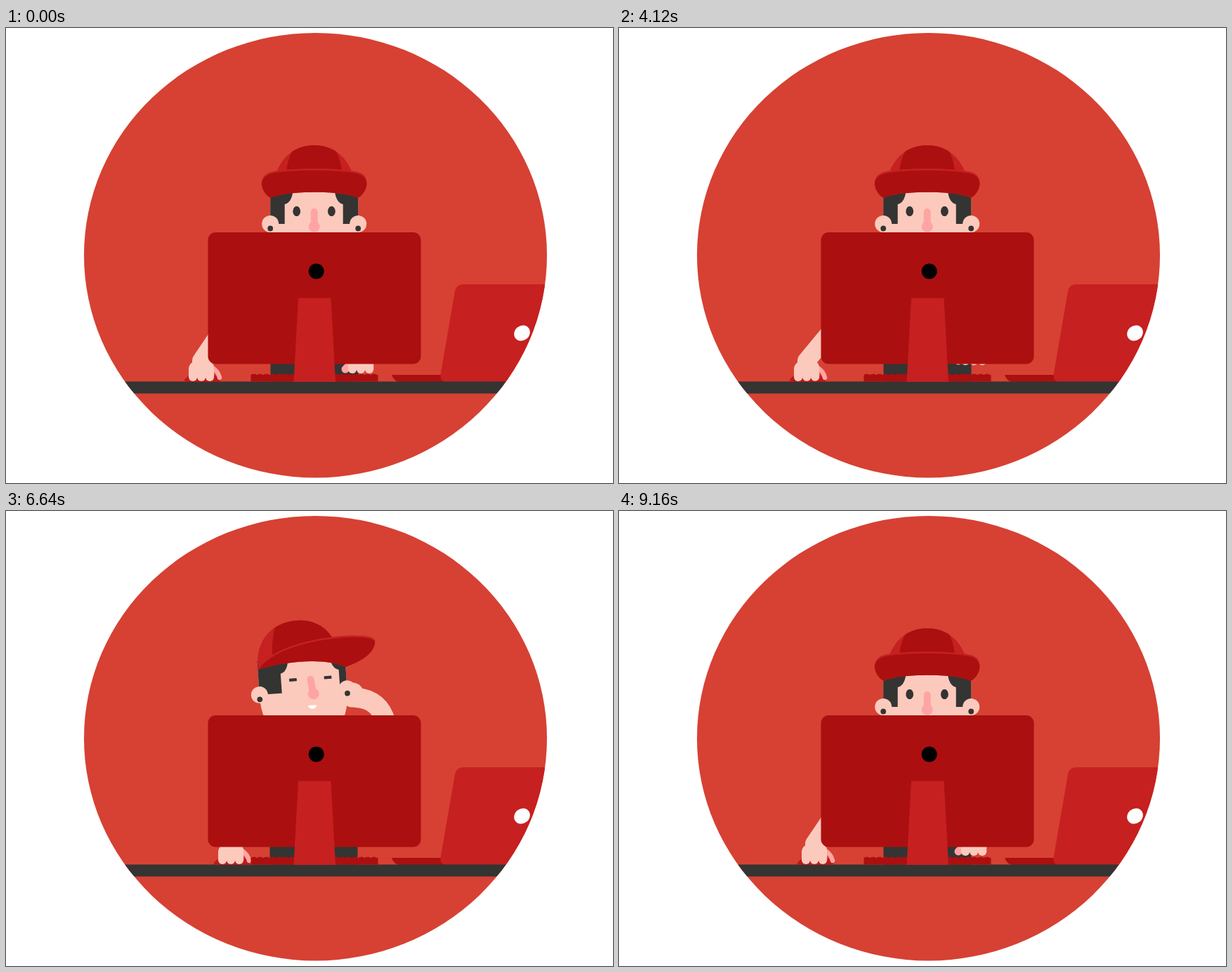
Animation of 864 by 648 pixels, one loop 9.2 s. Source, as an HTML page with a canvas:

```html
<!DOCTYPE html>
<html lang="en">
<head>
<meta charset="utf-8">
<title>At the desk</title>
<style>
html, body { margin: 0; width: 100%; height: 100%; overflow: hidden; background: #fff; }
canvas { display: block; }
</style>
</head>
<body>
<canvas id="stage" width="864" height="648"></canvas>
<script>
const c = document.getElementById('stage').getContext('2d');
const LOOP = 9200, STEP = 40, TAU = Math.PI * 2;
const BACK = '#d64133', DEEP = '#ac0f0f', RED = '#c62020', DARK = '#343433',
      SKIN = '#fbcabd', PINK = '#ffa4a4', WHITE = '#fff';
let now = 0;

const lerp = (a, b, k) => a + (b - a) * k;

// Eased 0 to 1 between two times.
function go(from, to) {
  const k = Math.min(1, Math.max(0, (now - from) / (to - from)));
  return k * k * (3 - 2 * k);
}

// Rises, holds, then falls back.
const pulse = (a, b, d, e) => go(a, b) - go(d, e);

function fill(color) { c.fillStyle = color; c.fill(); }

function oval(x, y, rx, ry, color, rot = 0) {
  c.beginPath();
  c.ellipse(x, y, rx, ry, rot, 0, TAU);
  fill(color);
}

function box(x, y, w, h, r, color) {
  c.beginPath();
  c.roundRect(x, y, w, h, r);
  fill(color);
}

function shape(path, color) {
  c.fillStyle = color;
  c.fill(new Path2D(path));
}

function stroke(path, width, color) {
  c.lineWidth = width;
  c.lineCap = c.lineJoin = 'round';
  c.strokeStyle = color;
  c.stroke(new Path2D(path));
}

// Fills one outline, then a second one only where it overlaps the first.
function inset(outer, color, inner, innerColor, dy = 0) {
  shape(outer, color);
  c.save();
  c.clip(new Path2D(outer));
  c.translate(0, dy);
  shape(inner, innerColor);
  c.restore();
}

// k: 0 faces forward, 1 half turned, 2 fully turned.
function cap(k) {
  const q = Math.min(1, k), top = -112 + 10 * (k - q);
  const crown = `M${-54 - 4 * k} ${-73 + 17.5 * k}
    C${-45 - 9.5 * k} ${-97 + 12 * k} ${-26 - 8 * k} ${top} ${-k} ${top}
    C${26 - 4 * k} ${top} ${45 - 4 * k} ${-97 + 2 * k} ${54 - 3.5 * k} -73Z`;
  const panel = `M-40 ${-72 + 10 * k}
    C${-38 - 1.5 * k} ${-90 + 7 * k} -34 ${-101 + 6 * k} ${-25 - 4 * k} ${top - 1}
    H${25 + 8 * k}
    C${34 + 7 * k} ${-101 + 3 * k} ${38 + 7 * k} -90 ${40 + 7 * k} -70Z`;
  inset(crown, RED, panel, DEEP);

  const far = -75 + 13 * q, tip = 75 + 16 * k, farTop = -75 + 9 * k;
  const brim = `M${far} ${-57 + 10 * k}
    Q${far + 2 * k} ${farTop + 3 + 4 * k} ${-57 + 10 * k} ${farTop}
    C${-28 + 13 * k} ${-80 + 3 * k} ${30 + 10 * k} ${-80 + 1.5 * k} ${57 + 11 * k} -75
    Q${tip} -73 ${tip} ${-57 - 8 * q}
    Q${tip - 2} -43 62 ${-37 + 3 * k}
    C42 ${-48 + 2 * k} ${-40 + 14 * k} -48 -62 ${-37 + q}
    Q${far + 2} ${-43 + 4 * k} ${far} ${-57 + 10 * k}Z`;
  inset(brim, RED, brim, DEEP, 2.6);
}

function eye(x, open) {
  c.save();
  c.beginPath();
  c.rect(x - 8, -18 - 7 * open, 16, 14 * open);
  c.clip();
  oval(x, -18, 5.4, 7.2, DARK);
  c.restore();
}

function head(right) {
  const left = pulse(1500, 1900, 3120, 3520), dip = pulse(4800, 5040, 5040, 5560);
  const smile = pulse(6800, 7160, 8280, 8600), open = 1 - .7 * pulse(5240, 5560, 6800, 7000);
  const k = left + 2 * right, s = 7.5 * k - 1.75 * right * k;
  c.save();
  c.translate(438.7 - 15.5 * right + 1.8 * smile, 279 + left + 14 * dip - 21.5 * right + .5 * smile);
  c.rotate((.3 * smile - 4 * right) * Math.PI / 180);
  if (left > 0) c.scale(-1, 1);

  shape('M-62.5 -45H62.5V4C62 50 35 75 0 75S-62 50 -62.5 4Z', SKIN);
  box(-62.5, -48, 125, 48, 0, DARK);
  shape(`M${s - 42} 1v-29q10 -2 12 -20h59q2 18 12 20v29Z`, SKIN);
  for (const x of [-62.5, 62.5]) {
    oval(x, 0, 12, 12, SKIN);
    oval(x, 6.5, 3.9, 3.9, DARK);
  }
  eye(s - 25, open);
  eye(s + 24.7, open);
  stroke(`M${s} -17L${s * 1.2} 3`, 10, PINK);
  oval(s * 1.24, 3.8, 8, 8, PINK);
  c.beginPath();
  c.ellipse(s, lerp(20, 16, smile), lerp(6, 18.5, smile), lerp(5, 18, smile), 0, 0, Math.PI);
  fill(WHITE);
  cap(k);
  c.restore();
}

function leanArm() {
  const k = pulse(5160, 5600, 6760, 7000), drop = 70 * (1 - k);
  if (k <= 0) return;
  const rub = now > 5800 && now < 6640 ? 6 * (1 - Math.cos(TAU * (now - 5800) / 280)) : 0;
  const y = 262 + drop - rub;
  stroke(`M499 ${y + 4}Q532 ${y + 6} 541 ${302 + drop}`, 28, SKIN);
  oval(493, y, 17, 17.5, SKIN);
}

function thumbUp() {
  const k = pulse(7120, 7520, 8040, 8320);
  if (k <= 0) return;
  const x = 533 + 25 * k, y = 314 - 112 * k;
  stroke(`M${x + 9} ${y + 42}L540 400`, 25, SKIN);
  stroke(`M${x} ${y}v24`, 12, SKIN);
  box(x - 8, y + 9, 28, 40, 7, SKIN);
  for (let i = 0; i < 4; i++) box(x, y + 11 + i * 10, 29 - 2 * Math.abs(i - 1), 11, 5.5, SKIN);
}

function fingers(x, bottom, top) {
  for (let i = 0; i < 3; i++) box(x - 18 + i * 12, top, 12.2, bottom - top, [0, 0, 6, 6], SKIN);
}

function mouseHand() {
  const x = 278 + 18 * pulse(40, 440, 460, 900) - 41 * pulse(920, 1320, 1520, 2200)
    + 21 * pulse(2100, 2500, 3160, 3600) - 11 * pulse(3160, 3600, 4200, 4700)
    + 42 * pulse(4200, 4760, 8320, 8880);
  c.beginPath();
  c.ellipse(x + 1.5, 504, 26, 13, 0, Math.PI, TAU);
  fill('#bd1919');
  stroke(`M${x} 474L355 ${360 + .7 * (278 - x)}`, 26, SKIN);
  stroke(`M${x + 16} 484q8 5 10 14`, 6.5, PINK);
  c.save();
  c.translate(x, 488);
  c.rotate(-Math.max(0, 270 - x) * .0035);
  fingers(0, 15, -1);
  box(-18, -14, 36, 18, [12, 9, 3, 3], SKIN);
  c.restore();
}

function typingHand() {
  const x = 505 - 102 * pulse(1040, 1440, 3160, 3680) - 15 * pulse(1040, 1440, 1520, 1960)
    + 70 * pulse(1960, 2400, 2500, 3000) + 12 * pulse(4720, 4960, 8600, 8800);
  const tap = 6.5 * (1 - Math.cos(TAU * 21 * now / LOOP));
  const y = 492 - tap - 40 * pulse(4880, 5060, 8680, 8880);
  stroke(`M${x - 15} ${y - 13}l-7 7`, 11, PINK);
  fingers(x, y, y - 24);
  box(x - 22, y - 40, 40, 29, 8, SKIN);
}

function desk() {
  shape('M549 494H640V504H562Q552 504 549 494Z', DEEP);
  shape('M790 365H651Q641 365 639 375L618.5 494Q618 504 627 504H790Z', RED);
  oval(734.5, 434.5, 11.8, 10.4, WHITE, -.65);
  box(100, 503.6, 680, 17, 0, DARK);
}

function keyboard() {
  box(348.5, 494, 181, 9.6, 0, DEEP);
  for (let x = 349; x < 526; x += 9) box(x, 492.8, 7.5, 5, 2, DEEP);
}

function draw() {
  const right = pulse(5040, 5560, 8160, 8640);
  c.fillStyle = WHITE;
  c.fillRect(0, 0, 864, 648);
  c.save();
  c.beginPath();
  c.ellipse(440.5, 323.7, 329.5, 316.7, 0, 0, TAU);
  fill(BACK);
  c.clip();
  desk();
  box(376.5 - right, 400, 125, 103.6, 0, DARK);
  leanArm();
  thumbUp();
  head(right);
  mouseHand();
  keyboard();
  typingHand();
  box(287.5, 291, 303, 187.5, 11, DEEP);
  shape('M416 384.5H462.5L469 504H409.5Z', RED);
  oval(441.7, 346.5, 11, 11, '#000');
  c.restore();
}

const start = performance.now();
function tick() {
  now = Math.floor((performance.now() - start) % LOOP / STEP) * STEP;
  draw();
  requestAnimationFrame(tick);
}
tick();
</script>
</body>
</html>
```
